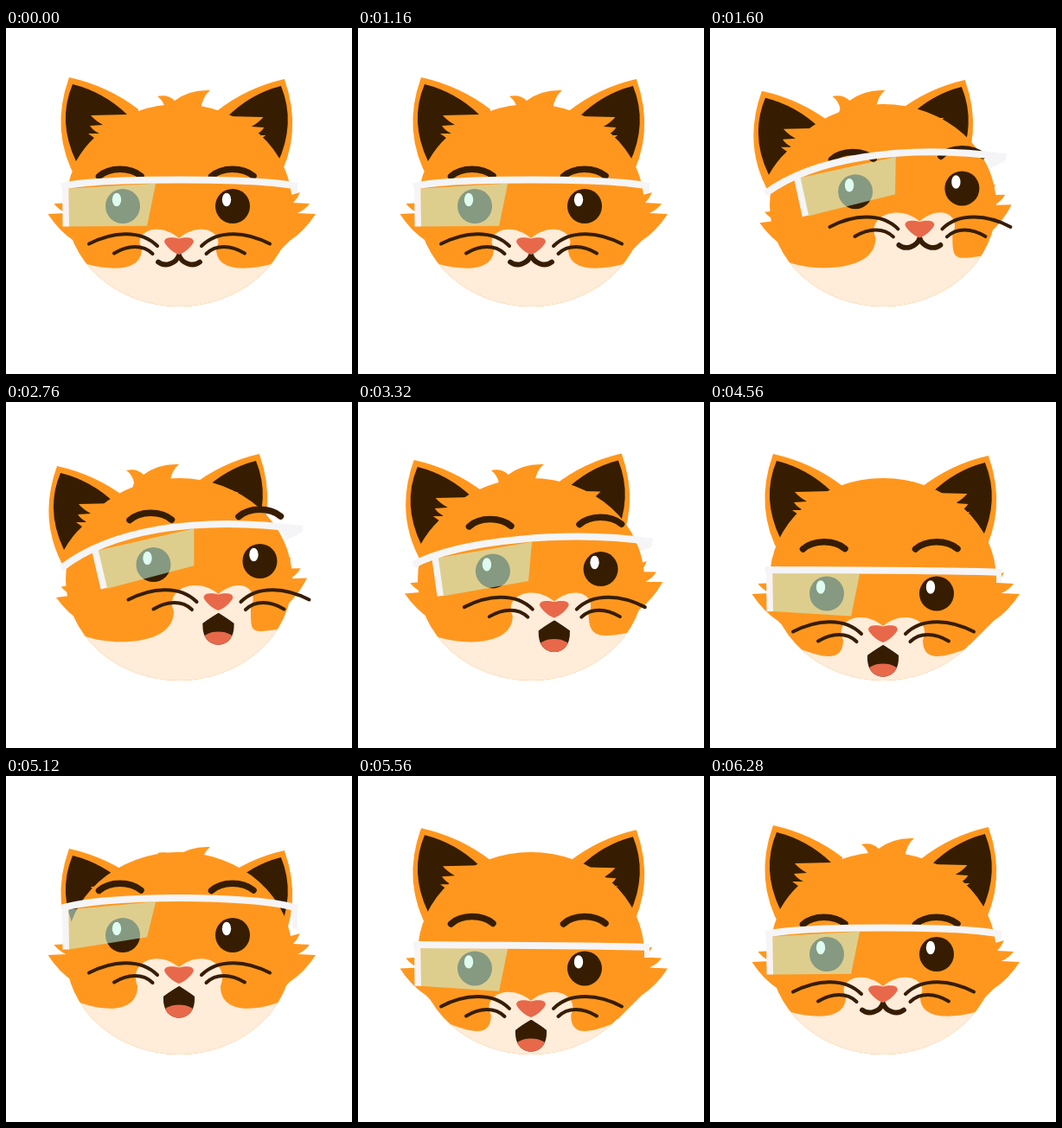
These frames come from a looping animation (400 by 400 pixels, 6.64 s). An HTML page:

```html
<!DOCTYPE html>
<html lang="en">
<head>
<meta charset="utf-8">
<title>Cat with smart glasses</title>
<style>
  html, body { margin: 0; width: 100%; height: 100%; overflow: hidden; background: #fff; }
  svg { display: block; width: 100vw; height: 100vh; }
  .fur { fill: #ff971e; }
  .dark { fill: #361d02; }
  .pink { fill: #e7694a; }
  .line { fill: none; stroke: #361d02; stroke-linecap: round; stroke-linejoin: round; }
  .frame { fill: none; stroke: #f5f5f7; }
</style>
</head>
<body>
<svg viewBox="0 0 400 400">
  <defs>
    <clipPath id="headClip"><ellipse cx="200" cy="205" rx="131" ry="117"/></clipPath>
    <clipPath id="mouthClip"><path d="M200.5,265 L182,277 C181,294 190,301.5 200,301.5 C210,301.5 219,294 218,277 Z"/></clipPath>
    <g id="ear">
      <path class="fur" d="M73,57 Q118,67 153,94 L150,150 L82,176 Q50,120 73,57 Z"/>
      <path class="dark" d="M77,65 Q113,74 140,100 L98,101 Q103,107 112,112 L97,113 Q101,119 108,122 L95,122 L102,127 Q90,138 81,154 Q59,108 77,65 Z"/>
    </g>
    <path id="cheek" class="fur" d="M322,195 L340,190 Q337,197 332,202 L351,203 Q346,210 337,214 L358,215 Q345,235 328,246 L300,274 L270,225 Z"/>
    <g id="eye">
      <circle class="dark" r="20"/>
      <ellipse cx="-7" cy="-7.5" rx="5.2" ry="7.7" fill="#fff"/>
    </g>
    <path id="brow" class="line" stroke-width="7.5" d="M-24,0.5 C-12,-10.5 12,-10.5 24.5,0"/>
    <g id="whiskers" class="line" stroke-width="4">
      <path d="M96,249.5 C122,236 155,232 175,252"/>
      <path d="M125,260.5 C141,251 158,250 169.5,261"/>
    </g>
  </defs>

  <g id="earL"><use href="#ear"/></g>
  <g id="earR"><use href="#ear" transform="translate(393 2) scale(-.975 1)"/></g>
  <path id="hair" class="fur" d="M175,79 Q187,76 195,84 Q212,71 236,72 Q227,79 225,95 L225,115 L178,115 L184,93 Q182,84 175,79 Z"/>
  <g id="cheeks">
    <use href="#cheek"/>
    <use href="#cheek" transform="translate(406.5 0) scale(-1 1)"/>
  </g>
  <g clip-path="url(#headClip)">
    <rect class="fur" width="400" height="400"/>
    <path id="muzzle" fill="#ffecd9"/>
  </g>

  <use id="eyeL" href="#eye"/>
  <use id="eyeR" href="#eye"/>
  <use id="browL" href="#brow"/>
  <use id="browR" href="#brow"/>

  <path id="lens" fill="#c4f9e5" fill-opacity=".56"/>
  <path id="arm" class="frame" stroke-width="7.5"/>
  <path id="hinge" fill="#f5f5f7"/>
  <path id="bar" class="frame" stroke-width="8"/>

  <g id="snout">
    <use href="#whiskers"/>
    <use href="#whiskers" transform="translate(401 0) scale(-1 1)"/>
    <g id="mouth">
      <g clip-path="url(#mouthClip)">
        <rect class="dark" x="175" y="260" width="50" height="45"/>
        <ellipse class="pink" cx="200" cy="298" rx="20" ry="11.5"/>
      </g>
    </g>
    <path id="lip" class="line"/>
    <path class="pink" d="M183,247 C184,241 193,242 200,243.5 C207,242 216,241 217,247 C215,253 206,260 200,262 C194,260 185,253 183,247 Z"/>
  </g>
</svg>

<script>
const LOOP = 6640;
const el = id => document.getElementById(id);
const draw = (id, d) => el(id).setAttribute("d", d);
const transform = (id, value) => el(id).setAttribute("transform", value);
const place = (id, x, y) => transform(id, `translate(${x} ${y})`);

const easeInOut = t => t < .5 ? 4 * t ** 3 : 1 - 4 * (1 - t) ** 3;
const easeOut = t => 1 - (1 - t) ** 3;
const smooth = t => t * t * (3 - 2 * t);

// Moves from one value to the next: [start, end, value, easing]
const track = (moves, t) => moves.reduce((v, [from, to, value, ease]) =>
  v + (value - v) * ease(Math.min(1, Math.max(0, (t - from) / (to - from)))), 0);

const TURN = [[1125, 1765, 1, easeInOut], [2740, 4060, 0, smooth]];
const NOD = [[4060, 4720, 1.06, easeInOut], [4720, 5120, -1, easeInOut],
             [5120, 5520, 1.06, easeInOut], [5520, 6090, 0, easeInOut]];
const SPEAK = [[2100, 2400, 1, easeOut], [6020, 6320, 0, easeOut]];

// Half width of the head at height y
const headEdge = y => 131 * Math.sqrt(1 - ((y - 205) / 117) ** 2);

function bezier(points, s) {
  const r = 1 - s, weights = [r ** 3, 3 * r * r * s, 3 * r * s * s, s ** 3];
  return [0, 1].map(axis => points.reduce((sum, p, i) => sum + p[axis] * weights[i], 0));
}

function render(t) {
  const turn = track(TURN, t), nod = track(NOD, t), open = track(SPEAK, t);
  const down = Math.max(0, nod), up = Math.max(0, -nod);
  const tilt = (turned, low, high) => turned * turn + low * down - high * up;
  const shift = (id, x, y, turnX, turnY, low, high) => {
    const pos = [x + turnX * turn, y + tilt(turnY, low, high)];
    place(id, ...pos);
    return pos;
  };

  shift("earL", 0, 0, -14, 17, 3, -27);
  shift("earR", 0, 0, -29, 1, 3, -27);
  shift("hair", 0, 0, -36, 0, 20, -10);
  const [nx, ny] = shift("snout", 0, 0, 45.5, -21, 16, 22);
  transform("cheeks", `translate(200 ${215 + tilt(0, 7, 8)}) rotate(${-4.4 * turn})
    scale(${1 - .06 * turn} 1) translate(-200 -215)`);

  const lift = 35 + 3 * turn + (17 - 3 * turn) * open;
  const [lx, ly] = shift("eyeL", 135, 206, 35.5, -18, 15.5, 22);
  const [rx, ry] = shift("eyeR", 262, 206, 31.5, -22, 15.5, 22);
  place("browL", lx - 3.5, ly - lift);
  place("browR", rx - .5, ry - lift);

  drawMuzzle(turn, tilt, nx, ny);
  drawGlasses(turn, up, tilt);
  drawMouth(open);
}

function drawMuzzle(turn, tilt, nx, ny) {
  const side = (dir, slide, rise, edgeRise, depthRise) => {
    const edgeY = 273 + tilt(edgeRise, 13, 11);
    const edgeX = 200 + dir * headEdge(edgeY);
    const x = 200 + dir * (43 - tilt(0, -3, 5)) + slide * turn;
    const y = 255 + tilt(rise, 20, 12);
    const depth = 281 + tilt(depthRise, 17, 8);
    return {
      edge: `${edgeX},${edgeY}`, outside: `${200 + dir * 200},${edgeY - 13}`,
      low: `${edgeX - dir * 31},${depth}`, corner: `${x},${depth}`,
      inner: `${x},${y}`, bump: `${x + dir * 11},${237 + ny}`,
      crest: `${200 + nx + dir * 25},${222 + ny}`
    };
  };
  const l = side(-1, 37, -13, -2, 1), r = side(1, 40, -17, -10, -14);
  draw("muzzle", `M${l.outside} L${l.edge} C${l.low} ${l.corner} ${l.inner}
    C${l.bump} ${l.crest} ${200 + nx},${243 + ny} C${r.crest} ${r.bump} ${r.inner}
    C${r.corner} ${r.low} ${r.edge} L${r.outside} V400 H0 Z`);
}

function drawGlasses(turn, up, tilt) {
  const bar = [
    [64, 183 + tilt(9, 11, 30)],
    [110 + 8 * turn, 173 + tilt(-23, 21.5, 36)],
    [290 - 75 * turn, 173 + tilt(-43, 21.5, 36)],
    [337 + 6 * turn, 183 + tilt(-36, 14, 30)]
  ];
  draw("bar", `M${bar[0]} C${bar.slice(1).join(" ")}`);

  // The lens hangs from two points of the bar, which slide as the head turns.
  const [ax, ay] = bezier(bar, .055 + .165 * turn);
  const [bx, by] = bezier(bar, .42 + .22 * turn);
  const lean = 11 * turn, bottom = ay + 48 + 2 * up;
  draw("lens", `M${ax},${ay + 4} L${bx},${by + 4}
    L${bx - 10 + 10 * turn},${by + 53 - 6 * turn - 8 * up} L${ax + lean},${bottom} Z`);
  draw("arm", `M${ax - 4},${ay - 1} L${ax - 3.5 + lean},${bottom}`);

  const [hx, hy] = bar[3];
  draw("hinge", `M${hx - 6 - 21 * turn},${hy - 4} L${hx},${hy - 3}
    L${hx - 3 * turn},${hy + 8 + tilt(-3, 4, -18)} L${hx - 6 - 13 * turn},${hy + 8 + tilt(5, 4, -14)} Z`);
}

// The closed lip line tightens into the upper edge of the open mouth.
function drawMouth(open) {
  const mix = (closed, opened) => closed + (opened - closed) * open;
  const half = mix(24, 17), end = mix(270.5, 277.5), dip = mix(277, 274);
  const inner = mix(3, 5), outer = mix(16, 13), middle = mix(272, 269);
  draw("lip", `M${200 - half},${end} C${200 - outer},${dip} ${200 - inner},${middle} 200,${mix(262.5, 266)}
    C${200 + inner},${middle} ${200 + outer},${dip} ${200 + half},${end}`);
  el("lip").setAttribute("stroke-width", mix(5.8, 2));
  transform("mouth", `translate(0 ${265 * (1 - open)}) scale(1 ${open})`);
  el("mouth").setAttribute("visibility", open > .01 ? "visible" : "hidden");
}

const began = performance.now();
function tick() {
  render((performance.now() - began) % LOOP);
  requestAnimationFrame(tick);
}
tick();
</script>
</body>
</html>
```
